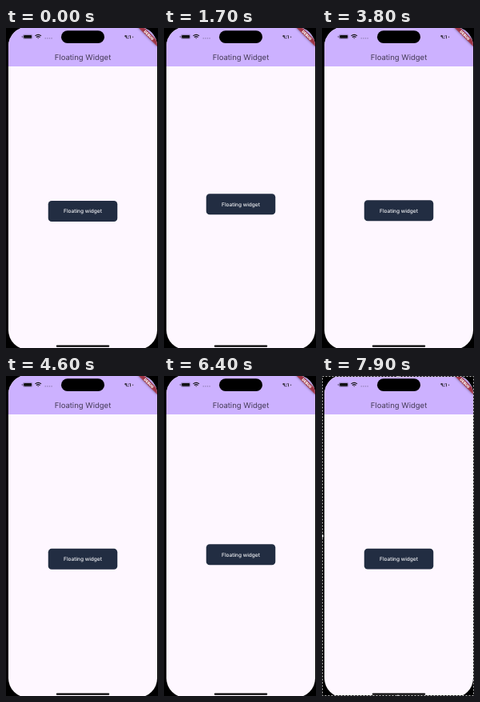
An HTML page that plays this animation: 190x400 px, repeating every 8 s.

```html
<!DOCTYPE html>
<html lang="en">
<head>
<meta charset="utf-8">
<title>Floating Widget</title>
<style>
  html, body { margin: 0; width: 100%; height: 100%; overflow: hidden; background: #000; }
  svg { display: block; width: 190px; height: 400px; }
  text { font-family: Inter, Roboto, sans-serif; text-anchor: middle; text-rendering: geometricPrecision; }
  .clock { font-family: "DejaVu Sans", sans-serif; }
</style>
</head>
<body>
<svg viewBox="0 0 190 400">
  <defs>
    <clipPath id="screen"><rect x="3" y="-1.4" width="186" height="403.2" rx="24"/></clipPath>
    <filter id="soft" x="-20%" y="-150%" width="140%" height="400%"><feGaussianBlur stdDeviation="1.7"/></filter>
  </defs>
  <rect width="190" height="400" fill="#000"/>

  <g clip-path="url(#screen)">
    <rect width="190" height="403" fill="#fef7ff"/>
    <rect y="-2" width="190" height="50" fill="#ccb1ff"/>
    <text x="96" y="39.5" font-size="9.5" fill="#463c58">Floating Widget</text>

    <g id="battery">
      <rect x="21.3" y="8.3" width="11.6" height="5.2" rx="1.6" fill="none" stroke="#000" stroke-opacity=".4" stroke-width=".6"/>
      <rect x="22.1" y="9" width="10" height="3.8" rx="1" fill="#111"/>
      <rect x="19.8" y="10" width=".9" height="1.9" rx=".4" fill="#55496a"/>
    </g>
    <g fill="none" stroke="#111" stroke-width="1.1">
      <path d="M36.4 9.9Q40.2 6.9 44 9.9M37.9 11.5Q40.2 9.7 42.5 11.5"/>
      <path d="M39.2 12.4h2l-1 1z" fill="#111" stroke="none"/>
    </g>
    <path d="M48.6 12.8H58" stroke="#8f7cb3" stroke-width="1.3" stroke-dasharray="1.3 1.3"/>
    <text class="clock" x="154.4" y="13.2" font-size="6.2" fill="#111" stroke="#111" stroke-width=".25">٩:١٠</text>

    <g transform="translate(178.6 9) rotate(45)">
      <rect x="-17.3" y="-2.6" width="34.6" height="5.2" fill="#000" opacity=".5" filter="url(#soft)"/>
      <rect x="-17.3" y="-2.6" width="34.6" height="5.2" fill="#b71c1c" opacity=".63"/>
      <text y="1.6" font-size="4.4" font-weight="900" fill="#fff">DEBUG</text>
    </g>

    <g id="button">
      <rect x="52.75" width="86.5" height="25.95" rx="4.3" fill="#222d42"/>
      <text x="96" y="15.4" font-size="6.5" font-weight="500" fill="#f4f5f8">Floating widget</text>
    </g>
  </g>

  <rect x="69" y="3.2" width="54" height="15.9" rx="7.95" fill="#000"/>
  <rect x="62.8" y="396.6" width="66.4" height="2.1" rx="1" fill="#000"/>

  <g id="selection" visibility="hidden">
    <rect x=".5" y=".5" width="189" height="399" fill="none" stroke="#000"/>
    <rect x=".5" y=".5" width="189" height="399" fill="none" stroke="#b4b4b4" stroke-dasharray="2 2"/>
    <g fill="#ddd" stroke="#777" stroke-width=".5">
      <circle cx="0" cy="200" r="2"/>
      <circle cx="95" cy="0" r="1.5"/>
      <circle cx="95" cy="400" r="1.5"/>
    </g>
  </g>
</svg>
<script>
  const LOOP = 8000, FLOAT_PERIOD = 4000, SELECT_AT = 6900;
  const button = document.getElementById("button");
  const selection = document.getElementById("selection");

  // [ms, top edge]: a quick lift followed by a slow sink
  const path = [
    [0, 216], [350, 217.2], [550, 216.4], [900, 211.9], [1000, 210.9],
    [1300, 208.5], [1700, 207.3], [2300, 209.7], [2500, 210.8],
    [2700, 211.8], [3200, 213.6], [3600, 214.8], [3800, 215.3]
  ];

  function point(i) {
    const n = path.length, turn = Math.floor(i / n);
    const [t, y] = path[i - turn * n];
    return [t + turn * FLOAT_PERIOD, y];
  }

  function slope(i) {
    const [t0, y0] = point(i - 1), [t1, y1] = point(i + 1);
    return (y1 - y0) / (t1 - t0);
  }

  // Cubic Hermite curve through the cyclic points
  function floatTop(ms) {
    const t = ms % FLOAT_PERIOD;
    let i = path.length - 1;
    while (path[i][0] > t) i--;
    const [t0, y0] = point(i), [t1, y1] = point(i + 1);
    const span = t1 - t0, u = (t - t0) / span, v = 1 - u;
    return y0 * v * v * (1 + 2 * u) + y1 * u * u * (3 - 2 * u)
      + span * u * v * (slope(i) * v - slope(i + 1) * u);
  }

  function draw(ms) {
    button.setAttribute("transform", `translate(0 ${floatTop(ms).toFixed(2)})`);
    selection.setAttribute("visibility", ms >= SELECT_AT ? "visible" : "hidden");
  }

  const start = performance.now();
  function frame() {
    const elapsed = (performance.now() - start) % LOOP;
    draw(Math.floor(elapsed / 100) * 100);
    requestAnimationFrame(frame);
  }
  draw(0);
  requestAnimationFrame(frame);
</script>
</body>
</html>
```
